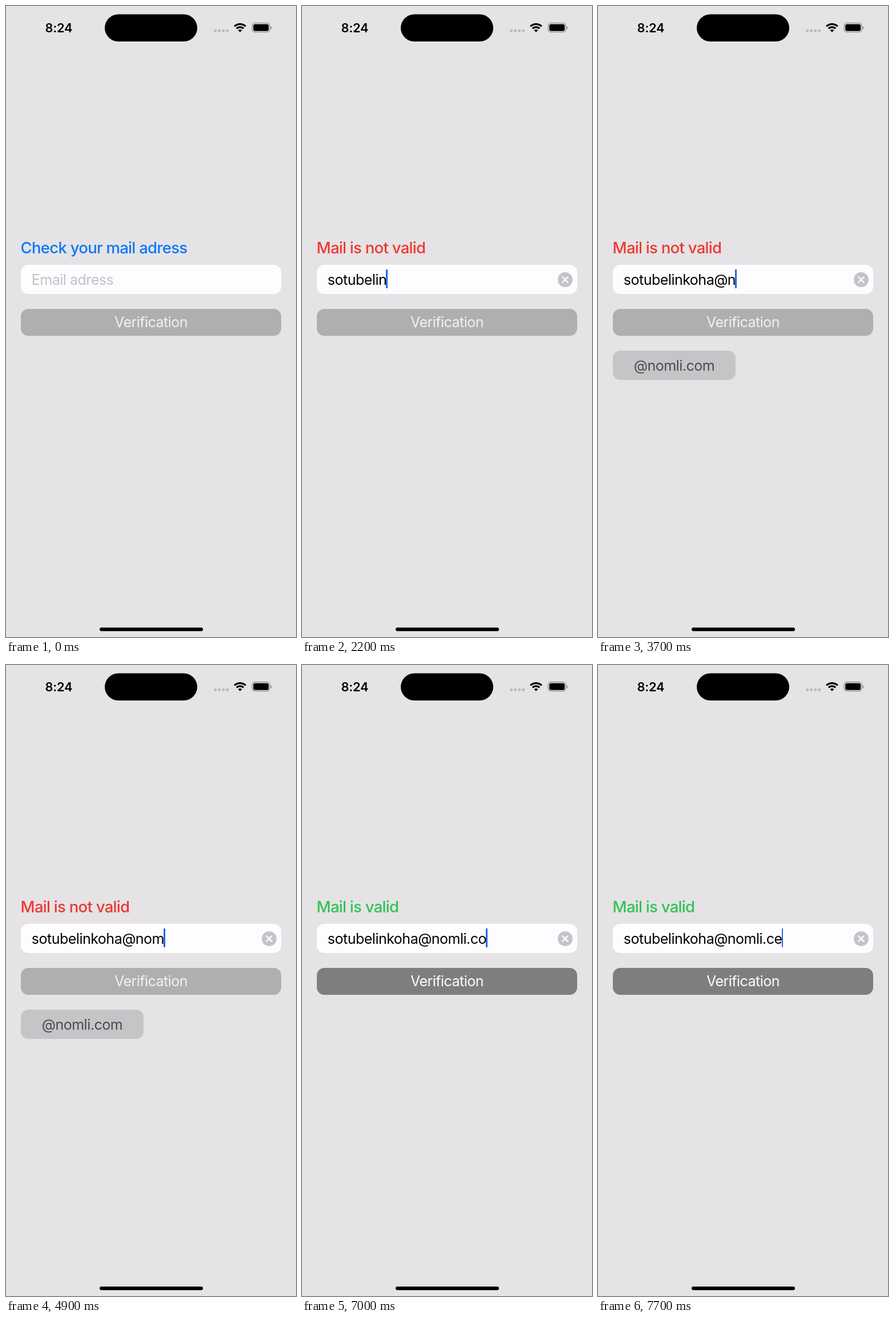
Write an HTML page that moves like this. It is 508x1102 px and loops after 8000 ms.

```html
<!DOCTYPE html>
<html lang="en">
<head>
<meta charset="utf-8">
<title>Mail check</title>
<style>
  html, body { margin: 0; width: 100%; height: 100%; overflow: hidden; background: #e5e3e6; }
  body { position: relative; font: 25px/52px Inter, "Open Sans", sans-serif; letter-spacing: -.02em; white-space: pre; }
  [hidden] { display: none !important; }
  svg, #title, .box, #chips { position: absolute; }
  svg { left: 0; top: 0; }
  #title { left: 25.5px; top: 402px; font-size: 27.5px; font-weight: 500; line-height: 40px; letter-spacing: -.026em; }
  .box { left: 25.8px; width: 456.4px; border-radius: 13px; }
  #field { top: 451.7px; height: 51.7px; background: #fefcff; }
  #line { position: absolute; left: 19px; top: 0; }
  #hint { color: #c3c1c6; position: absolute; left: 0; top: 0; }
  #caret { display: inline-block; width: 2.6px; height: 33px; margin-left: -1px; vertical-align: middle;
    position: relative; top: -3px; border-radius: 1px; background: #2168e4; }
  #verify { top: 529.4px; height: 46.4px; line-height: 46.6px; text-align: center; }
  #chips { left: 25.8px; top: 601.8px; width: 456.4px; display: grid; grid-template-columns: 1fr 1fr; gap: 13px 25.8px; }
  #chips div { height: 51.6px; border-radius: 13px; background: #c6c4c7; color: #4b494d; text-align: center; }
</style>
</head>
<body>
<svg width="508" height="1102">
  <text x="68.5" y="45.7" font-size="21.8" font-weight="600" letter-spacing="-.2">8:24</text>
  <rect x="173" y="14.5" width="162" height="47.5" rx="23.75"/>
  <g fill="#b9b7ba">
    <rect x="364.5" y="41" width="4.6" height="4.6" rx="1.5"/>
    <rect x="371.4" y="41" width="4.6" height="4.6" rx="1.5"/>
    <rect x="378.4" y="41" width="4.6" height="4.6" rx="1.5"/>
    <rect x="385.4" y="41" width="4.6" height="4.6" rx="1.5"/>
  </g>
  <path d="M400.2 35.7A13.8 13.8 0 0 1 419.8 35.7M403.9 39.4A8.7 8.7 0 0 1 416.1 39.4" fill="none" stroke="#000" stroke-width="3.2"/>
  <path d="M410 45.8L406.6 42.3A4.8 4.8 0 0 1 413.4 42.3Z"/>
  <rect x="431.2" y="29.7" width="31" height="16" rx="5" fill="none" stroke="#8f8d90" stroke-width="1.3"/>
  <rect x="433.2" y="31.7" width="27" height="12" rx="3.2"/>
  <path d="M463.7 35.2Q465.9 36 465.9 37.8T463.7 40.4Z" fill="#8f8d90"/>
  <rect x="164" y="1085.4" width="181" height="6.4" rx="3.2"/>
</svg>
<div id="title"></div>
<div id="field" class="box"><div id="line"><span id="hint">Email adress</span><span id="text"></span><span id="caret"></span></div></div>
<svg id="clear" width="508" height="520">
  <circle cx="461" cy="478" r="13" fill="#c5c3c8"/>
  <path d="M456.4 473.4l9.2 9.2m0-9.2l-9.2 9.2" stroke="#fefcff" stroke-width="2.3" stroke-linecap="round"/>
</svg>
<div id="verify" class="box">Verification</div>
<div id="chips"></div>
<script>
const LOOP = 8000, TICK = 100;
const $ = id => document.getElementById(id);
const mail = 'sotubelinkoha@nomli.com';
const hosts = ['@nomli.com', '@vilpod.com', '@veshu.com', '@zavuno.ru', '@wuli.ru'];

// Edits as [time, text]: typing, completion, two deletions, one new letter
const typed = [1000, 1100, 1200, 1300, 1400, 1700, 1900, 2100, 2200, 2400, 2600, 2800, 2900, 3300, 3600, 3800, 3900];
const edits = [
  [-700, ''],
  ...typed.map((t, i) => [t, mail.slice(0, i + 1)]),
  [6000, mail], [7000, mail.slice(0, -1)], [7200, mail.slice(0, -2)], [7700, mail.slice(0, -2) + 'e']
];

const chips = hosts.map(host => {
  const chip = document.createElement('div');
  chip.textContent = host;
  return $('chips').appendChild(chip);
});

// Blink: half a second on, soft fade out, soft fade in
function caretAlpha(age) {
  const step = Math.round(age % 1000 / TICK);
  return [1, 1, 1, 1, 1, .6, .15, 0, 0, .5][step];
}

function draw(t) {
  const [since, text] = edits.findLast(e => e[0] <= t);
  const valid = /@\w+\.\w{2,}$/.test(text);
  const at = text.indexOf('@');
  $('title').textContent = !text ? 'Check your mail adress' : valid ? 'Mail is valid' : 'Mail is not valid';
  $('title').style.color = !text ? '#0a78f5' : valid ? '#2fc456' : '#ee382e';
  $('text').textContent = text;
  $('hint').hidden = !!text;
  $('clear').style.display = text ? '' : 'none';
  $('caret').style.opacity = caretAlpha(t - since);
  $('verify').style.background = valid ? '#7f7d80' : '#b0aeb1';
  $('verify').style.color = valid ? '#fefcff' : '#f3f1f4';
  chips.forEach((chip, i) => {
    chip.hidden = valid || at < 0 || !hosts[i].startsWith(text.slice(at));
  });
}

function frame() {
  draw(Math.floor(performance.now() % LOOP / TICK) * TICK);
  requestAnimationFrame(frame);
}
frame();
</script>
</body>
</html>
```
